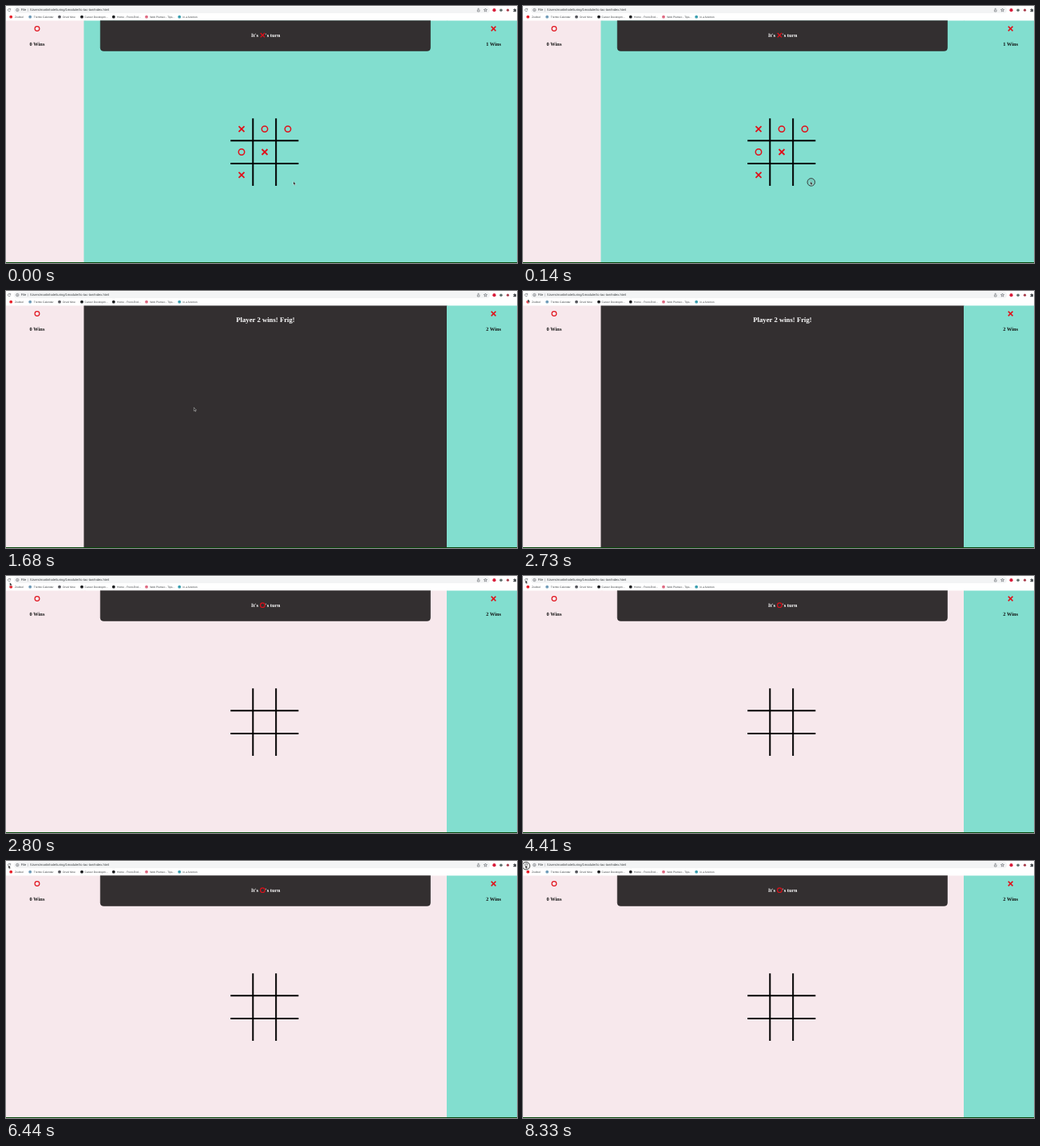
Write an HTML page that moves like this. It is 640 by 323 pixels and loops after 8.4 s.

```html
<!DOCTYPE html>
<html lang="en">
<head>
<meta charset="utf-8">
<title>Tic-tac-toe</title>
<style>
  html, body { margin: 0; width: 100%; height: 100%; overflow: hidden; background: #fff; }
  svg { display: block; width: 100vw; height: 100vh; text-rendering: geometricPrecision; }
  .ui { font: 3.35px "Liberation Sans", sans-serif; fill: #3c4043; }
  .url { font-size: 4.1px; }
  .page { font: bold 6.4px "Liberation Serif", serif; fill: #111; }
  .middle { text-anchor: middle; }
  .light { fill: #fff; }
  .turn { font-size: 6.6px; }
  .result { font-size: 8.7px; }
  .mark { fill: none; stroke: #e0101a; }
  .line { fill: none; stroke: #5f6368; stroke-width: .6; }
  .dark { fill: #332f30; }
  .pink { fill: #f7e8ec; }
  .teal { fill: #82decf; }
</style>
</head>
<body>
<svg viewBox="0 0 640 323" preserveAspectRatio="none">
  <defs>
    <circle id="o" r="3.7" class="mark" stroke-width="1.5"/>
    <path id="x" d="M-3.5-3.5 3.5 3.5M3.5-3.5-3.5 3.5" class="mark" stroke-width="1.8"/>
  </defs>

  <rect width="640" height="323" fill="#fff"/>
  <rect x="10" y="1" width="596" height="8" rx="4" fill="#f3f4f5"/>
  <g class="ui">
    <path id="reload" class="line"/>
    <circle cx="14.3" cy="5" r="1.7" class="line" stroke-width=".4"/>
    <path d="M14.3 4.7V6M14.3 3.9V4.3" class="line"/>
    <text x="18.8" y="6.4" class="url">File</text>
    <path d="M27.5 3.2V6.8" class="line" opacity=".5"/>
    <text x="30" y="6.4" class="url">/Users/martinhale/turing/1module/tic-tac-toe/index.html</text>
    <path d="M590.4 4.5V7H593V4.5M591.7 5.6V3M590.9 3.7 591.7 2.9 592.5 3.7" class="line"/>
    <path d="M600.5 3 601.1 4.4 602.6 4.5 601.4 5.5 601.8 7 600.5 6.2 599.2 7 599.6 5.5 598.4 4.5 599.9 4.4Z" class="line" stroke-width=".4"/>
    <circle cx="611.5" cy="5.2" r="2.1" fill="#d91f3c"/>
    <circle cx="620" cy="5.2" r="1.8" fill="#60706d"/>
    <circle cx="628.5" cy="5.2" r="1.6" fill="#a83d4b"/>
    <path d="M635.4 4.1h1.1v-.9h1.2v.9h1.2v3.1h-3.5v-1.1h.8v-1h-.8Z" fill="#45494d"/>
    <g id="bookmarks"></g>
  </g>

  <g class="page">
    <rect y="18.4" width="100" height="303.6" class="pink"/>
    <rect id="arena" x="97.5" y="18.4" width="455" height="303.6"/>
    <rect x="552" y="18.4" width="88" height="303.6" class="teal"/>
    <use href="#o" transform="translate(39 28.5) scale(.78)"/>
    <use href="#x" transform="translate(610.6 28.5) scale(.82)"/>
    <text x="39" y="49.5" class="middle">0 Wins</text>
    <text id="score" x="610.6" y="49.5" class="middle"></text>

    <g id="game">
      <path d="M118.2 18.4H531.5V52.5Q531.5 56.5 527.5 56.5H122.2Q118.2 56.5 118.2 52.5Z" class="dark" stroke="#211e1f" stroke-width=".5"/>
      <text x="307" y="38.8" class="light turn">It's</text>
      <use id="turn" transform="translate(321.4 36.7) scale(.76)"/>
      <text x="324.8" y="38.8" class="light turn">'s turn</text>
      <path d="M309.3 141.2V226M338.2 141.2V226M281.2 169.2H366.4M281.2 198H366.4" stroke="#000" stroke-width="2"/>
      <g id="moves"></g>
    </g>
    <text id="result" x="325" y="39.3" class="middle light result">Player 2 wins! Frig!</text>
  </g>
  <rect y="322" width="640" height="1" fill="#06480a"/>

  <circle id="ring" r="4.8" fill="#000" fill-opacity=".08" stroke="#333" stroke-width=".9"/>
  <path id="cursor" d="M0 0V4.3L1 3.5 1.7 5 2.4 4.7 1.7 3.2H3Z" fill="#111" stroke="#fff" stroke-width=".4"/>
</svg>
<script>
const LOOP = 8400, STEP = 70, WIN = 210, RESET = 2800;
const presses = [[70, 210], [3920, 4060], [6300, 6440], [8330, 8400]];
const loading = [4060, 4270];
// Pointer stops: time, x, y
const path = [[0, 360, 220.5], [980, 360, 220.5], [2730, 6, 10.2],
              [2800, 4.7, 8], [3360, 3, 5.2], [LOOP, 3, 5.2]];
const board = ["XOO", "OX ", "X  "];
const bookmarks = [
  [6.2, 11, "#e8202a", "Zovibel"],
  [30.2, 34.8, "#6f9bb8", "Tremlo Calendar"],
  [67, 71, "#55565c", "Orvel Nine"],
  [95, 98.6, "#17191c", "Career Developm…"],
  [134.8, 139, "#17191c", "Home - Front-End…"],
  [176, 180.2, "#df6b83", "Web Plumeo - Tips…"],
  [217.2, 221.6, "#3a9fb0", "in.a.function"]
];

const $ = id => document.getElementById(id);
const show = (id, on) => $(id).setAttribute("visibility", on ? "visible" : "hidden");
const place = (id, x, y) => $(id).setAttribute("transform", `translate(${x} ${y})`);
const within = (t, [from, to]) => t >= from && t < to;
const ease = u => u * u * (3 - 2 * u);

$("bookmarks").innerHTML = bookmarks.map(([cx, x, color, label]) =>
  `<circle cx="${cx}" cy="13.7" r="1.9" fill="${color}"/><text x="${x}" y="14.9">${label}</text>`).join("");

$("moves").innerHTML = board.flatMap((row, r) => [...row].map((mark, c) => mark === " " ? "" :
  `<use href="#${mark.toLowerCase()}" x="${295 + 29 * c}" y="${154.6 + 28.9 * r}"/>`)).join("");

function pointerAt(t) {
  const i = path.findIndex(([end], n) => n > 0 && t <= end);
  const [t0, x0, y0] = path[i - 1], [t1, x1, y1] = path[i];
  const u = ease((t - t0) / (t1 - t0));
  return [x0 + (x1 - x0) * u, y0 + (y1 - y0) * u];
}

function draw(t) {
  const playing = t < WIN, won = t >= WIN && t < RESET;
  $("arena").setAttribute("class", playing ? "teal" : won ? "dark" : "pink");
  $("score").textContent = playing ? "1 Wins" : "2 Wins";
  $("turn").setAttribute("href", playing ? "#x" : "#o");
  show("game", !won);
  show("moves", playing);
  show("result", won);
  $("reload").setAttribute("d", within(t, loading)
    ? "M2.7 3.7 5.3 6.3M5.3 3.7 2.7 6.3"
    : "M5.4 3.9A1.7 1.7 0 1 0 5.7 5.5M5.7 3V4.3H4.4");

  const [x, y] = pointerAt(t);
  place("cursor", x, y);
  place("ring", x + .9, y + .9);
  show("ring", presses.some(press => within(t, press)));
}

function frame() {
  draw(Math.floor(performance.now() % LOOP / STEP) * STEP);
  requestAnimationFrame(frame);
}
frame();
</script>
</body>
</html>
```
